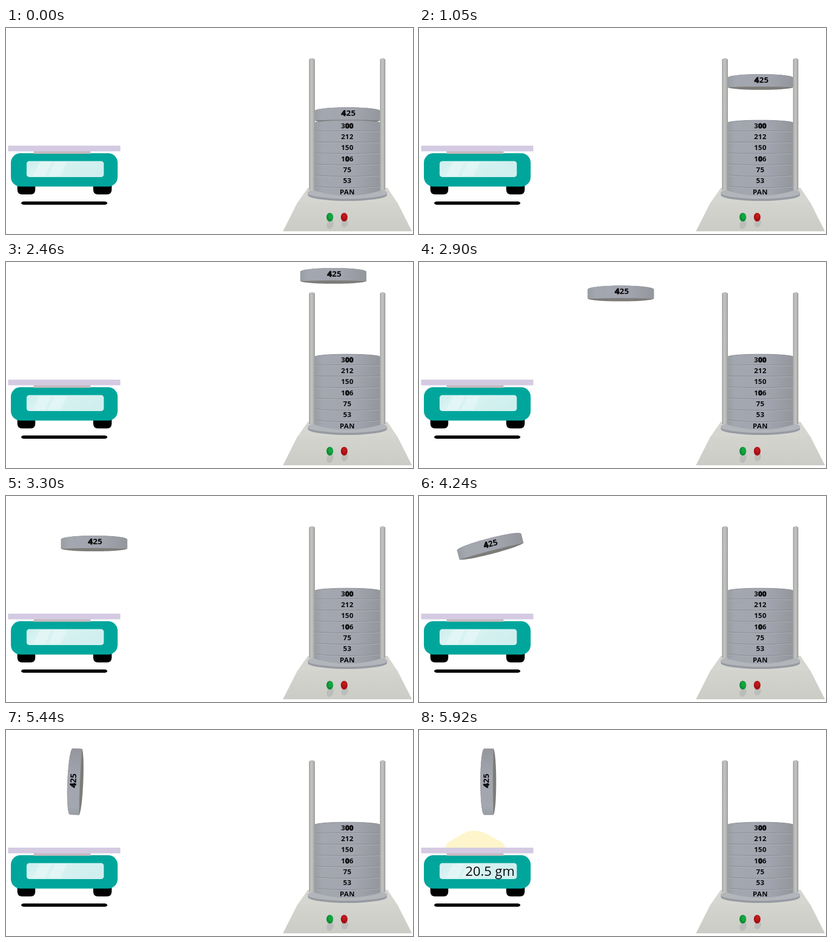
An HTML page for the animation above (6.25 s loop, 751 by 380 pixels).

```html
<!DOCTYPE html>
<html lang="en">
<head>
<meta charset="utf-8">
<title>Sieve weighing</title>
<style>
  html, body { margin: 0; width: 100%; height: 100%; overflow: hidden; background: #fff; }
  svg { display: block; width: 751px; height: 380px; }
  text { font-family: "Open Sans", "Noto Sans", sans-serif; fill: #0b0b0d; }
  .label { font-weight: 700; font-size: 13px; letter-spacing: .2px; text-anchor: middle; }
  .heavy { stroke: #0b0b0d; stroke-width: 1px; }
</style>
</head>
<body>
<svg viewBox="0 0 751 380">
  <defs>
    <linearGradient id="steel">
      <stop offset="0" stop-color="#999da4"/>
      <stop offset=".12" stop-color="#a3a7af"/>
      <stop offset=".6" stop-color="#a2a5af"/>
      <stop offset="1" stop-color="#94969c"/>
    </linearGradient>
    <linearGradient id="rod">
      <stop offset="0" stop-color="#a2a5a6"/>
      <stop offset=".4" stop-color="#c4c5c1"/>
      <stop offset=".75" stop-color="#b4b5b2"/>
      <stop offset="1" stop-color="#979893"/>
    </linearGradient>
    <linearGradient id="front" x2="0" y2="1">
      <stop offset="0" stop-color="#d3d4ce"/>
      <stop offset="1" stop-color="#cbccc6"/>
    </linearGradient>
    <linearGradient id="glass" y2=".3">
      <stop offset="0" stop-color="#cdeeee"/>
      <stop offset=".3" stop-color="#d9f3f2"/>
      <stop offset="1" stop-color="#cfefee"/>
    </linearGradient>
  </defs>

  <!-- scale -->
  <path id="powder" fill="#fff5cc" d="M48 218C50 206 62 203 75 195Q101 177 129 194C144 203 158 206 159 218Z"/>
  <path d="M21 290H54V298Q54 307 45 307H30Q21 307 21 298ZM161 290H195V298Q195 307 186 307H170Q161 307 161 298Z"/>
  <rect x="9" y="231" width="197" height="61.5" rx="17.5" fill="#00a69c"/>
  <rect x="51" y="226" width="105" height="6" fill="#c4b9bf"/>
  <rect x="4" y="217" width="207" height="10.5" fill="#d4cbe3"/>
  <rect x="38" y="245.5" width="142.5" height="29.5" rx="5" fill="url(#glass)"/>
  <path d="M62 247H84L72 273H50ZM90 247H113L101 273H78Z" fill="#fff" opacity=".25"/>
  <rect x="28" y="320" width="159" height="6" rx="5" ry="3"/>
  <text id="weight" x="176.5" y="268.5" font-size="24.5" text-anchor="end">20.5 gm</text>

  <!-- shaker base -->
  <path d="M557 295H704L722 322H538Z" fill="#d5d6d0"/>
  <path d="M538 321.5H722L749 375H511Z" fill="url(#front)"/>
  <path d="M557 304V308A73 11 0 0 0 703 308V304Z" fill="#979aa1"/>
  <ellipse cx="630" cy="304" rx="73.5" ry="11" fill="#b2b5ba"/>
  <g fill="#aeb0b2" opacity=".55">
    <ellipse cx="598" cy="362" rx="6" ry="9" transform="rotate(20 598 362)"/>
    <ellipse cx="625" cy="360" rx="6" ry="8" transform="rotate(20 625 360)"/>
  </g>
  <ellipse cx="597.5" cy="349" rx="6.2" ry="8" fill="#0b8f33"/>
  <ellipse cx="599" cy="347.5" rx="4.2" ry="5.5" fill="#14a540"/>
  <ellipse cx="624" cy="349" rx="6.2" ry="8" fill="#a90f14"/>
  <ellipse cx="624.5" cy="346.5" rx="4.2" ry="5" fill="#bd1a1b"/>

  <!-- moving sieve, centred on its own origin -->
  <g id="disc">
    <path d="M-61 -8C-56 -17 56 -17 61 -8V9.5C50 16 -50 16 -61 9.5Z" fill="#7d7c78"/>
    <path d="M-61 -8C-56 -17 56 -17 61 -8V9.5Q0 7 -61 9.5Z" fill="url(#steel)"/>
    <text class="label" x="2" y="1.2" style="font-size:15px"><tspan class="heavy">4</tspan>25</text>
  </g>

  <g id="stack">
    <path d="M569 175C576 168.5 684 168.5 691 175V300Q630 319 569 300Z" fill="url(#steel)"/>
    <path d="M569 175C576 168.5 684 168.5 691 175" fill="none" stroke="#85878e"/>
  </g>
  <path d="M559 58Q564.5 53 570 58V299H559Z" fill="url(#rod)"/>
  <path d="M690 58Q695 53 700 58V299H690Z" fill="url(#rod)"/>
</svg>
<script>
const $ = id => document.getElementById(id);
const stack = $("stack");

function add(tag, attrs, html = "") {
  const el = document.createElementNS("http://www.w3.org/2000/svg", tag);
  for (const k in attrs) el.setAttribute(k, attrs[k]);
  el.innerHTML = html;
  stack.append(el);
}

const heavy = s => `<tspan class="heavy">${s}</tspan>`;
const names = ["3" + heavy("00"), "212", "150", "1" + heavy("0") + "6", "75", "53", "PAN"];
names.forEach((name, i) => {
  const y = 180 + 20.3 * i;
  if (i) {
    const seam = (dy, stroke) => add("path", {
      d: `M569.5 ${y - 10 + dy}q60.5 ${i * 1.5 - 3} 121 0`,
      fill: "none", stroke, "stroke-width": 1
    });
    seam(0, "#84868d");
    seam(1, "#b0b3ba");
  }
  add("text", { class: "label", x: 629.7, y: y + 4.7 }, name);
});

const LOOP = 6250, STEP = 40;
const home = [630, 161], high = [630, 22], hover = [132, 92], tipped = [128, 95.5];

// Progress 0..1 of a move, advancing in 40 ms steps
const part = (t, start, dur) =>
  Math.min(1, Math.max(0, Math.floor((t - start) / STEP + 1e-6) * STEP / dur));
const half = u => 0.5 * Math.pow(2 * u, 2.65);
const ease = u => u < 0.5 ? half(u) : 1 - half(1 - u);
const mix = (a, b, k) => a.map((v, i) => v + (b[i] - v) * k);

function draw(t) {
  const lift = ease(part(t, 330, 1510));
  const slide = ease(part(t, 2140, 1500));
  const spin = part(t, 4000, 1480);
  const pour = part(t, 5480, 440);
  const [x, y] = mix(mix(mix(home, high, lift), hover, slide), tipped, spin);
  $("disc").setAttribute("transform", `translate(${x} ${y}) rotate(${-90 * spin})`);
  $("powder").setAttribute("opacity", pour);
  $("weight").setAttribute("opacity", pour);
}

const t0 = performance.now();
function tick() {
  draw((performance.now() - t0) % LOOP);
  requestAnimationFrame(tick);
}
draw(0);
requestAnimationFrame(tick);
</script>
</body>
</html>
```
